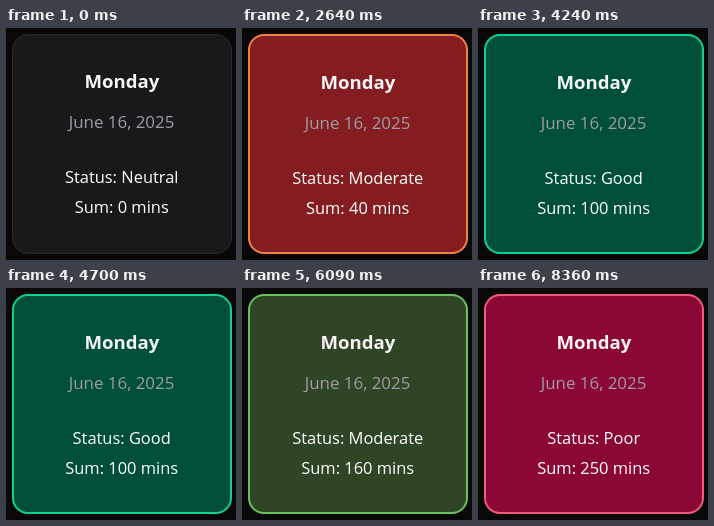
Write an HTML page that moves like this. It is 230x232 px and loops after 8.39 s.

```html
<!DOCTYPE html>
<html lang="en">
<head>
<meta charset="utf-8">
<title>Day status card</title>
<style>
  html, body { margin: 0; width: 100%; height: 100%; overflow: hidden; background: #080808; }
  svg { display: block; width: 230px; height: 232px; }
  text { font: 16.45px "Open Sans", "Noto Sans", sans-serif; fill: #fff; text-anchor: middle; }
  #day { font-size: 18.6px; font-weight: 700; fill: #f4f4f5; }
  #date { font-size: 16.9px; fill: #a09ca4; }
</style>
</head>
<body>
<svg viewBox="0 0 230 232">
  <rect id="card"/>
  <g id="content">
    <text id="day" x="116" y="60">Monday</text>
    <text id="date" x="115.5" y="100">June 16, 2025</text>
    <text id="status" x="115.7" y="155"></text>
    <text id="sum" x="115.7" y="185"></text>
  </g>
</svg>
<script>
const LOOP = 8390;
const FADE = 450;

const themes = {
  Neutral:  { fill: [25, 25, 27],  line: [42, 42, 45],   border: 1 },
  Poor:     { fill: [139, 8, 54],  line: [242, 92, 122], border: 2 },
  Moderate: { fill: [123, 51, 6],  line: [245, 166, 14], border: 2 },
  Good:     { fill: [0, 79, 59],   line: [16, 208, 146], border: 2 },
};

const steps = [
  { at: 0,    status: "Neutral",  mins: 0 },
  { at: 300,  status: "Poor",     mins: 10 },
  { at: 2420, status: "Moderate", mins: 40 },
  { at: 3600, status: "Good",     mins: 100 },
  { at: 5900, status: "Moderate", mins: 160 },
  { at: 7850, status: "Poor",     mins: 250 },
];

const byId = id => document.getElementById(id);
const card = byId("card"), content = byId("content");
const status = byId("status"), sum = byId("sum");

const easeInOut = p => p * p * (3 - 2 * p);
const mix = (a, b, p) => `rgb(${a.map((v, i) => Math.round(v + (b[i] - v) * p))})`;

function setText(node, value) {
  if (node.textContent !== value) node.textContent = value;
}

function setAttributes(node, values) {
  for (const name in values) node.setAttribute(name, values[name]);
}

function render(time) {
  const index = steps.findLastIndex(step => step.at <= time);
  const step = steps[index];
  const from = themes[steps[Math.max(0, index - 1)].status];
  const to = themes[step.status];
  const p = easeInOut(Math.min(1, (time - step.at) / FADE));
  const border = Math.round(from.border + (to.border - from.border) * p);

  setAttributes(card, {
    x: 6 + border / 2, y: 6 + border / 2,
    width: 220 - border, height: 220 - border,
    rx: 16 - border / 2,
    fill: mix(from.fill, to.fill, p),
    stroke: mix(from.line, to.line, p),
    "stroke-width": border,
  });
  // A thicker border pushes the content down.
  content.setAttribute("transform", `translate(0 ${border - 1})`);
  setText(status, `Status: ${step.status}`);
  setText(sum, `Sum: ${step.mins} mins`);
}

const start = performance.now();
function tick() {
  render((performance.now() - start) % LOOP);
  requestAnimationFrame(tick);
}
tick();
</script>
</body>
</html>
```
